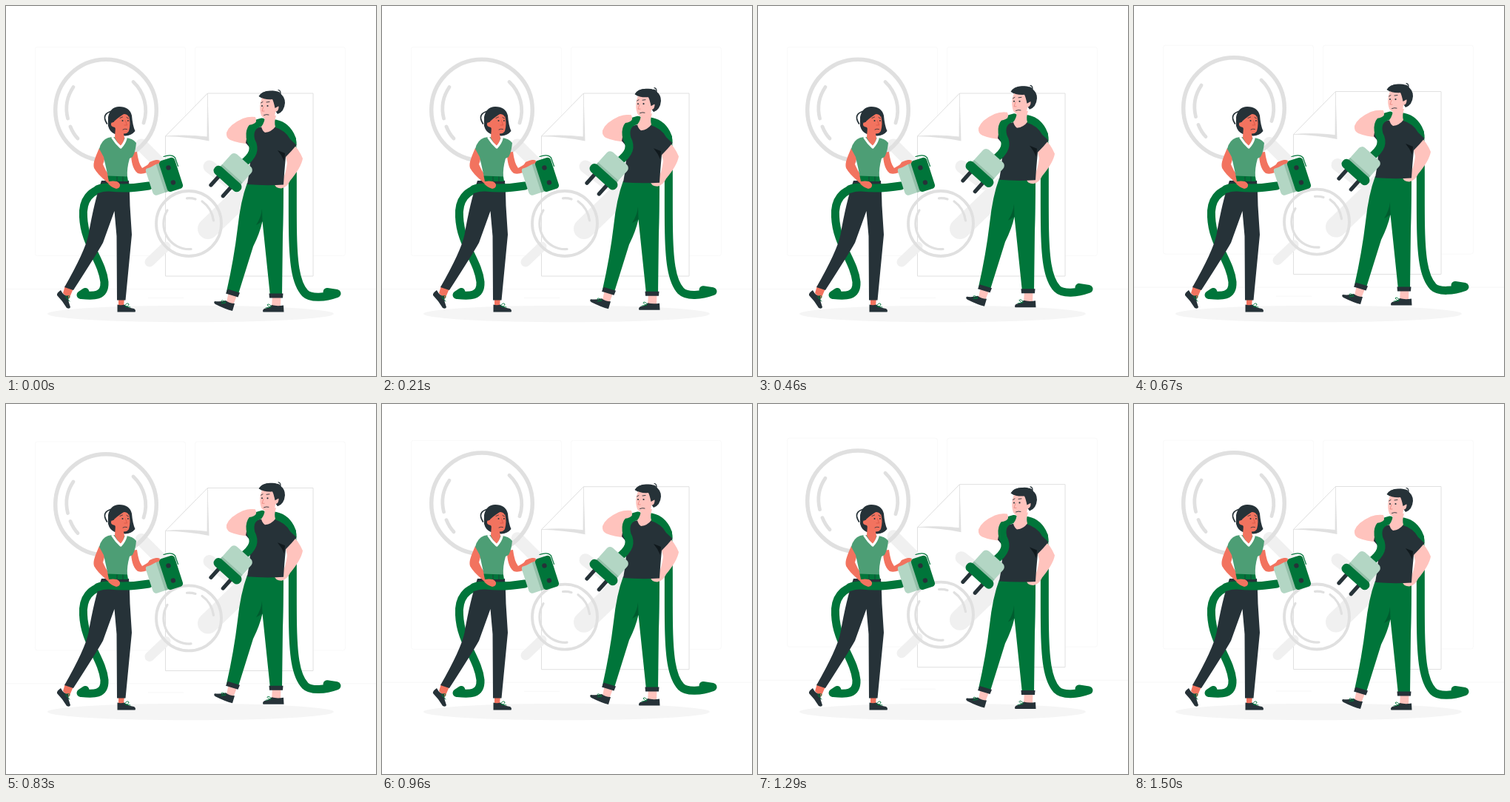
An HTML page that plays this animation: 500x500 px, repeating every 1.54 s.

```html
<!DOCTYPE html>
<html lang="en">
<head>
<meta charset="utf-8">
<title>Plug and socket</title>
<style>
  html, body { margin: 0; width: 100%; height: 100%; overflow: hidden; background: #fff; }
  svg { display: block; width: 100vw; height: 100vh; }
  .green { fill: #00753a; }
  .light { fill: #b3d6c4; }
  .shade { fill: #93bfa8; }
  .dark { fill: #263238; }
  .peach { fill: #ffc3bd; }
  .coral { fill: #f2735f; }
  .line { fill: none; stroke-linecap: round; stroke-linejoin: round; }
  .cord { stroke: #00753a; stroke-width: 11; }
  .ring { stroke: #e0e0e0; }
  .handle { stroke: #f0f0f0; }
  .ink { stroke: #263238; }
  .lace { stroke: #00753a; stroke-width: .9; }
</style>
</head>
<body>
<svg viewBox="0 0 500 500">
  <ellipse cx="249.500" cy="416" rx="193.500" ry="11.300" fill="#f5f5f5"/>

  <g id="backdrop">
    <g fill="none" stroke="#f9f9f9">
      <rect x="39.500" y="55.500" width="203" height="282" rx="3"/>
      <rect x="255.500" y="55.500" width="203" height="282" rx="3"/>
      <path d="M0 382.500H500M192 394.500h48" stroke="#f7f7f7"/>
    </g>
    <path d="M215.500 176 272.500 118H415V365H215.500Z" fill="#fff" stroke="#e0e0e0"/>
    <path d="M215.500 176Q248 177 274.500 182.500L272.500 118Z" fill="#e0e0e0"/>
    <path d="M215.500 176Q242 173.500 272 177L272.500 118Z" fill="#fff" stroke="#e0e0e0" stroke-width=".8"/>

    <g class="line handle">
      <path d="M183 188 225 230" stroke-width="17"/>
      <path d="M275 217 305 240" stroke-width="17"/>
      <path d="M273 301 335 241" stroke-width="28"/>
      <path d="M216 325 194 346" stroke-width="13"/>
    </g>
    <g class="line ring">
      <circle cx="135" cy="140.500" r="68.300" stroke-width="5.500"/>
      <path d="M91 109.500A53 53 0 0 0 83.500 152M87 163Q91 173 97 179M172 102.500A53 53 0 0 1 186 158" stroke-width="4.800"/>
      <circle cx="247" cy="294" r="44" stroke-width="3.800"/>
      <path d="M218 276A34.500 34.500 0 0 0 250 328.500M244.500 259.800Q251 259.300 256 261M265 264Q278 273 280.500 290" stroke-width="3.200"/>
    </g>
  </g>

  <g id="woman">
    <path class="line cord" d="M140 245C112 247 103 264 104.500 285C106 322 130 344 133 373C134 394 117 392 101 390.500L107 386.500"/>
    <path class="coral" d="M80 378 91 382 85 396 77 388ZM152 394H160L159 406H152Z"/>
    <path class="dark" d="M74 384Q78 392 84 392Q84 400 87 407Q86 410 82 408Q76 398 69 391Q68 388 74 384ZM150.500 403.500Q155 405 160 403.500Q165 408 173 409Q176 411 174.500 413.500H150.500Z"/>
    <path class="line lace" d="M80 393q6-3 6 0q0 3-5 1l5 5M160 405q4-5 6-2q0 3-5 3l7 1"/>
    <path class="dark" d="M129 236H166Q167 248 167.500 270L170 309L161.500 397.500H150L149.500 311L146.500 277L131 320Q122 336 91 384L79 380Q107 331 111.500 309Q119 265 129 236Z"/>

    <path class="coral" d="M126 192C121 204 117 212 119 219C126 231 137 237 141 243Q148 249 154 244Q155 239 148 236Q138 231 131 214L135 200ZM169 198C169 209 171 221 178 226Q186 229 200 220L208 212Q207 208 203 208L184 219Q179 213 177 197Z"/>
    <path d="M138 178Q147 176 149 178H161Q172 179 176 185Q175 197 171 204L167 206Q163 220 164 231H138Q135 218 132 204L126 193Q129 181 138 178Z" fill="#4d9e75"/>
    <path class="green" d="M137.500 229.500 164 230.500 165 237H139Z"/>
    <path class="line" d="M150 231V237M158 231V237" stroke="#263238" stroke-width=".7"/>

    <path class="dark" d="M138 150Q141 136 153 136Q167 136 170 148Q171 161 174.500 169Q168 177 157 175L147 173Q140 170 138 162Z"/>
    <path class="line ink" d="M143 142Q128 146 136.500 159" stroke-width="1.800"/>
    <path class="coral" d="M148 163 147 178Q152 187 155 190Q159 185 160 178L158 168Z"/>
    <path class="line" d="M144 178Q149 186 155 191Q160 186 162 179" stroke="#fff" stroke-width="3.200"/>
    <path class="coral" d="M146 154Q157 142 166 148Q169 159 166 169Q163 174 156 172Q149 169 147 164Q141 163 142 159Q143 155 146 157Z"/>
    <path class="dark" d="M143 158Q138 144 147 139Q158 133 167 145Q167 148 166 150Q163 145 159 146Q150 152 146 156Z"/>
    <path class="line ink" d="M154 151.500 157.500 150M163 150.500 165.500 152M158 167Q160.500 165.500 163.500 166.500" stroke-width=".8"/>
    <path class="line" d="M161.500 155 163.500 161H160" stroke="#d4503f" stroke-width=".7"/>
    <circle class="dark" cx="157.500" cy="155" r="1"/>
    <circle class="dark" cx="165" cy="155" r=".9"/>

    <path class="line cord" d="M124 247.500Q131 244.500 140 245C158 247 175 246 193 243"/>
    <path class="coral" d="M140 237Q149 235 154 241Q155 246 149 247Q142 245 138 240Z"/>
    <g transform="translate(213.500 231) rotate(-18)">
      <rect class="light" x="-21" y="-19.500" width="24" height="40" rx="5"/>
      <path class="shade" d="M-5-19.500H2V20.500H-5Z"/>
      <rect class="green" x="-1" y="-22" width="22" height="44" rx="4.500"/>
      <circle class="dark" cx="9.500" cy="-10" r="3.200"/>
      <circle class="dark" cx="9.500" cy="11" r="3.200"/>
    </g>
    <path class="coral" d="M194 211Q204 206 208 209Q208 213 202 214Q195 219 188 220Z"/>
    <path class="line" d="M213 203.500Q224 199.500 228.500 205L232.500 216.500" stroke="#00753a" stroke-width="1.200"/>
  </g>

  <g id="man">
    <path class="line cord" d="M386.500 180C388 215 387 250 387.500 300C388 345 391 374 404 388C412 396 432 394 447 388.500L434 386.500"/>
    <path class="peach" d="M301 386 313 389 307 404 298 400ZM360 390H371.500L371 408H359Z"/>
    <path class="dark" d="M297 398Q302 402 309 402L306 412Q297 410 283 403Q280 401 282 399Q290 400 297 398ZM359 404Q366 406 375 404.500L375.500 413.500H347.500Q346 411 349 409Q356 408 359 404Z"/>
    <path class="line lace" d="M297 400q-6-4-6-1q2 3 6 2l-6 1M359 406q-5-5-6-2q2 3 5 3l-7 1"/>
    <path class="green" d="M326 239H375Q375 285 374 310L373 392H357L346.500 291Q343 307 334 325L314 389L298 386Q308 342 313 300Q317 263 326 239Z"/>
    <path class="dark" d="M299.500 382.500 316 387.500 313.500 393.500 297 388.500ZM355.500 388.500H374.500L374 394.500H356Z"/>
    <path d="M346 274Q345 285 338 296L346.500 291Z" fill="#00512b" opacity=".7"/>

    <path class="peach" d="M337 150Q328 149 320 152Q302 160 298 171Q297 178 303 181Q315 186 329 186L334 168L326 167L338 158Z"/>
    <path class="peach" d="M387 186Q395 192 401 206Q399 218 384 236Q380 245 372 246.500Q364 246 363 241Q367 234 374 233Q378 228 380 212L377 200Z"/>
    <path class="dark" d="M337 165Q347 162 364 162Q380 165 386 175L392.500 188Q386 196 378 204Q376 225 375 241.500Q350 243 326 241Q331 215 330 192L324 185Q325 172 337 165Z"/>
    <path d="M377 199 367 195Q373 202 376 210Z" fill="#10191d"/>
    <path class="line cord" d="M319 214C335 202 337 193 331 182C328 170 331 160 346 157"/>
    <path class="green" d="M361 153Q380 155 389 172Q393 180 392.500 188L384 180Q378 168 361 163Z"/>
    <path class="peach" d="M345 163Q350 157 350 148H365Q362 157 364 163Q359 170 350 171Q346 168 345 163Z"/>
    <path class="peach" d="M323 154Q329 148 337 151Q340 156 335 159Q330 162 324 160Z"/>

    <path class="dark" d="M342 122Q347 114 358 114.500Q367 114 370 118Q377 122 377 131Q376 143 367 146L357 132Z"/>
    <path class="peach" d="M346 124Q358 121 362 128L363.500 136Q366 132 368.500 135Q369 142 364 143Q364 151 357 153Q349 154 345 148Q342 140 344 130Z"/>
    <path class="dark" d="M341.500 122Q346 114 358 115Q369 114 371 121Q375 126 373 136L368 135.500L363.500 138Q362 130 360 126Q349 127 341.500 122Z"/>
    <path class="line ink" d="M367 116Q371 117 371.500 120M368 113.500Q371 114 371 118" stroke-width="1.200"/>
    <path class="line ink" d="M352 130 356 129.500M344.500 131 347 129.500M348.500 147.500Q352 146 355 147" stroke-width=".9"/>
    <path class="line" d="M348 136 346 142H349" stroke="#e9837b" stroke-width=".8"/>
    <circle class="dark" cx="353.500" cy="135" r="1.100"/>
    <circle class="dark" cx="346" cy="135" r="1"/>

    <g transform="translate(299.500 233.500) rotate(42)">
      <path class="line ink" d="M-11 4V21.500M11 4V21.500" stroke-width="5.200"/>
      <rect class="light" x="-18.500" y="-33" width="37" height="33" rx="6"/>
      <path class="shade" d="M-18.500-9.500H18.500V0H-18.500Z"/>
      <rect class="green" x="-23" y="-6.500" width="46" height="13" rx="6"/>
    </g>
  </g>
</svg>
<script>
  const LOOP = 1540, CYCLE = 1500, LIFT = 10;
  const MAN_LEAD = 45, BACKDROP_DELAY = 490;
  const man = document.getElementById('man');
  const backdrop = document.getElementById('backdrop');

  // Linear rise and fall; rests until the delay has passed.
  function rise(time) {
    const phase = Math.max(0, time) % CYCLE / CYCLE;
    return LIFT * (1 - Math.abs(1 - 2 * phase));
  }

  function lift(group, height) {
    group.setAttribute('transform', `translate(0 ${(-height).toFixed(3)})`);
  }

  const start = performance.now();
  function draw() {
    const time = (performance.now() - start) % LOOP;
    lift(man, rise(time + MAN_LEAD) - rise(MAN_LEAD));
    lift(backdrop, rise(time - BACKDROP_DELAY));
    requestAnimationFrame(draw);
  }
  draw();
</script>
</body>
</html>
```
